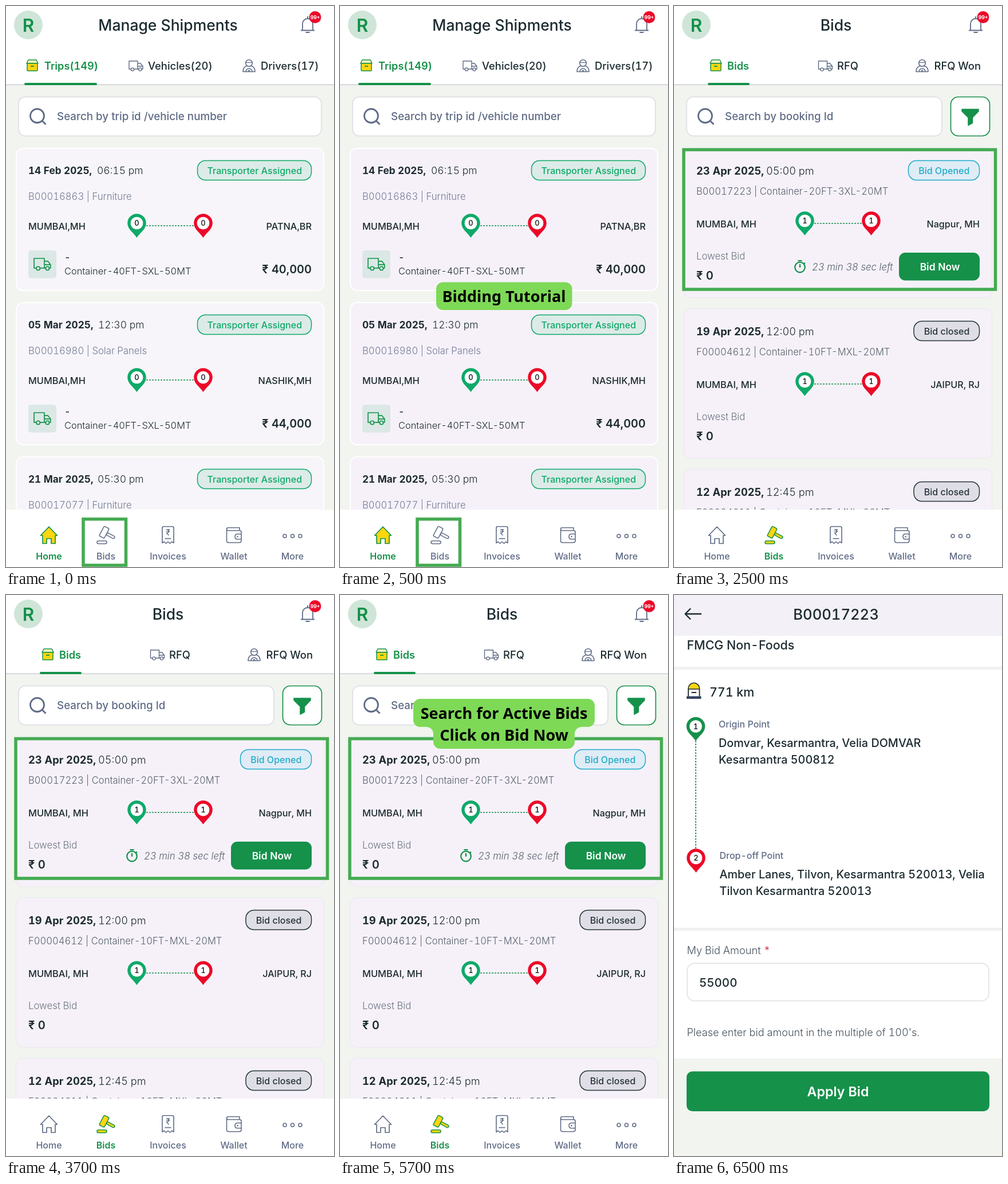
Recreate the animation shown at these times as an HTML page. Size 573 by 978 pixels, loop 8000 ms.

```html
<!DOCTYPE html>
<html lang="en">
<head>
<meta charset="utf-8">
<title>Shipment bidding</title>
<style>
html, body { margin: 0; height: 100%; overflow: hidden; background: #fff; }
svg { display: block; width: 573px; height: 978px; font-family: Inter, "Noto Sans", sans-serif; font-variant-numeric: tabular-nums; }
text { white-space: pre; }
.label { font-family: "Noto Sans", "Open Sans", sans-serif; }
</style>
</head>
<body>
<svg id="stage" viewBox="0 0 573 978"></svg>
<script>
const GREEN = '#15914a', DARK = '#1c2b30', SLATE = '#5f6b85', RED = '#ec0928',
  YELLOW = '#ffd60f', PAGE = '#f1f4ef', MINT = '#0fa968', MUTED = '#737b95', LIME = '#7ed957';

// y is the middle of the capitals
const text = (x, y, s, size, weight = 500, fill = DARK, anchor = 'start', extra = '') =>
  `<text x="${x}" y="${y + size * .36}" font-size="${size}" font-weight="${weight}" fill="${fill}" text-anchor="${anchor}" ${extra}>${s}</text>`;
const rect = (x, y, w, h, fill, r = 0, stroke = 'none', sw = 1.5) =>
  `<rect x="${x}" y="${y}" width="${w}" height="${h}" rx="${r}" fill="${fill}" stroke="${stroke}" stroke-width="${sw}"/>`;
const path = (d, stroke, sw = 1.6, fill = 'none', extra = '') =>
  `<path d="${d}" fill="${fill}" stroke="${stroke}" stroke-width="${sw}" stroke-linejoin="round" ${extra}/>`;
const circle = (x, y, r, fill, stroke = 'none', sw = 1.6) =>
  `<circle cx="${x}" cy="${y}" r="${r}" fill="${fill}" stroke="${stroke}" stroke-width="${sw}"/>`;
const at = (x, y, s, scale = 1) => `<g transform="translate(${x} ${y}) scale(${scale})">${s}</g>`;

const pin = (x, y, n, fill) => at(x, y,
  path('M0 25.5C-5 17-16.3 11-16.3 0A16.3 16.3 0 0 1 16.3 0C16.3 11 5 17 0 25.5Z', 'none', 0, fill) +
  circle(0, 0, 10.8, '#fff') + text(0, 0, n, 13, 500, '#111', 'middle'));
const dots = (d, w = 1.3) => path(d, GREEN, w, 'none', 'stroke-dasharray="3 2"');
const route = y => dots(`M245 ${y + 4.5}H329`);
const truck = (x, y, color, scale = 1) => at(x, y,
  path('M3.5 14H0V0H15V14H9M15 4H20L24 9V14H22M15 14H17M15 9H24', color, 1.4) +
  circle(6, 14.5, 2.6, 'none', color, 1.4) + circle(19.5, 14.5, 2.6, 'none', color, 1.4), scale);
const box = x => at(x, 93,
  path('M3 1H17L20 7H0Z', GREEN, 1.5, '#fff6c0') + rect(1, 7, 18, 13, YELLOW, 1, GREEN) +
  path('M7 12H13', GREEN, 1.8));
const driver = x => at(x, 93,
  circle(10.5, 6.5, 5.8, 'none', SLATE) + path('M5 5.5H16', SLATE, 1.2) +
  path('M6.5 11.5C2 13 0 17 0 21.5H21C21 17 19 13 14.5 11.5M5 21.5A5.5 5.5 0 0 1 16 21.5', SLATE, 1.5) +
  circle(10.5, 20, 1.2, 'none', SLATE, 1.2));

const pill = (x, y, s, fill, color, textFill = color) =>
  rect(x, y, 533.5 - x, 34, fill, 14, color) + text((x + 534) / 2, y + 17.5, s, 16, 500, textFill, 'middle');

function header(title) {
  return rect(0, 0, 573, 137, '#fff') + rect(0, 136.5, 573, 1.5, '#cdcfd4') +
    circle(39, 33, 25, '#cfe5d8') + text(39, 34, 'R', 31.5, 600, GREEN, 'middle') +
    text(283, 33.5, title, 26.5, 550, DARK, 'middle') +
    path('M515 42.5H539M518 42V31A9 9 0 0 1 536 31V42M527 18V22M523.5 46H530.5', SLATE, 1.8) +
    circle(540, 19.5, 10.5, RED) + text(540, 19.5, '99+', 8.6, 700, '#fff', 'middle');
}

function tabs(list, from, to) {
  const [a, b, c] = list;
  return box(a[0]) + text(a[1], 104, a[2], 18.2, 600, GREEN) +
    truck(b[0], 96, SLATE) + text(b[1], 104, b[2], 18.4) +
    driver(c[0]) + text(c[1], 104, c[2], 18.4) +
    rect(from, 134, to - from, 4, GREEN, 2);
}

const search = (w, s) => rect(22, 158.5, w, 68, '#fff', 12, '#dadce2') +
  circle(54.5, 191.5, 12, 'none', SLATE, 2.8) + path('M63 200L69.5 206.5', SLATE, 2.8) +
  text(89, 192.5, s, 18.8, 500, SLATE);

function nav(active) {
  const ink = n => active === n ? GREEN : SLATE, fill = n => active === n ? YELLOW : 'none';
  const name = (x, s) => text(x, 959.5, s, 16, active === s ? 600 : 500, ink(s), 'middle');
  const h = ink('Home'), b = ink('Bids');
  return rect(0, 878, 573, 100, '#fff') +
    path('M60.5 923L75 908L89.5 923H86V937H79V928.5H71V937H64V923Z', h, 1.7, fill('Home')) +
    rect(159, 932.5, 17, 5, fill('Bids'), 2.5, b) +
    `<g transform="translate(171.5 917.5) rotate(28)">${
      rect(5, -2.2, 15.5, 4.5, fill('Bids'), 2.2, b)}${rect(-5, -9.5, 10, 19, fill('Bids'), 2, b)}</g>` +
    path('M273 936V910Q273 907.5 275.5 907.5H290.5Q293 907.5 293 910V936L289.7 934L286.4 937L283 934L279.6 937L276.3 934Z', SLATE) +
    text(283, 918, '₹', 14, 500, SLATE, 'middle') + path('M277.5 928.5H288.5', SLATE) +
    path('M385.5 913V932Q385.5 935.5 389 935.5H407.5Q411 935.5 411 932V917Q411 914.5 408 914.5H388Q385.5 914.5 385.5 912T388 909.5H408V914', SLATE) +
    path('M411 920.5H403.5Q400 921 400 925T403.5 929.5H411', SLATE) + circle(404.5, 925, 1.3, SLATE) +
    [487, 500.5, 514].map(x => circle(x, 924, 3, 'none', SLATE)).join('') +
    name(75, 'Home') + name(174.5, 'Bids') + name(283, 'Invoices') + name(398, 'Wallet') + name(500.5, 'More');
}

const tripCard = (i, date, time, timeX, id, to, price) => at(0, i * 269,
  rect(18, 248, 537, 248, 'var(--card)', 12, '#fff', 2) +
  text(39, 287, date, 17.2, 700) + text(timeX, 287, time, 17.5, 300) +
  pill(334.5, 269.5, 'Transporter Assigned', '#dcebe8', MINT) +
  text(39, 331.5, id, 16.7, 300, MUTED) +
  text(39, 384, 'MUMBAI,MH', 16.3) + text(534, 384, to, 16.3, 500, DARK, 'end') +
  route(378.5) + pin(228.5, 378.5, 0, MINT) + pin(344.5, 378.5, 0, RED) +
  rect(39, 426, 49, 48.5, '#dbe8e6', 5) + truck(49, 440, GREEN, 1.2) +
  text(102, 438, '-', 16.4) + text(102, 462.5, 'Container-40FT-SXL-50MT', 16.4, 300) +
  text(534, 458.5, price, 20, 600, DARK, 'end'));

const bidCard = (i, date, time, id, to, status) => at(0, i * 280,
  rect(17.5, 247.5, 538, 261, '#f6f1f9', 12, '#e9e7ee', 1) +
  text(39, 287, date, 18.3, 700) + text(161, 287, time, 18.2, 300) + status +
  text(39, 323, id, 16.6, 300, '#56606c') +
  text(39, 380, 'MUMBAI, MH', 16.4) + text(534, 380, to, 16.1, 500, DARK, 'end') +
  route(374.5) + pin(228.5, 374.5, 1, MINT) + pin(344.5, 374.5, 1, RED) +
  text(39, 436, 'Lowest Bid', 16.8, 300, '#6b7480') + text(39, 470, '₹ 0', 20.3, 600));

const closed = pill(419, 269.5, 'Bid closed', '#dfdee6', '#26343a');
const frame = (x, y, w, h) => rect(x, y, w, h, 'none', 0, '#45ab52', 5.5);

const home = rect(0, 0, 573, 978, PAGE) + header('Manage Shipments') +
  tabs([[36, 67, 'Trips(149)'], [215, 248, 'Vehicles(20)'], [414, 445, 'Drivers(17)']], 32, 159) +
  search(529, 'Search by trip id /vehicle number') +
  tripCard(0, '14 Feb 2025,', '06:15 pm', 159, 'B00016863 | Furniture', 'PATNA,BR', '₹ 40,000') +
  tripCard(1, '05 Mar 2025,', '12:30 pm', 161, 'B00016980 | Solar Panels', 'NASHIK,MH', '₹ 44,000') +
  tripCard(2, '21 Mar 2025,', '05:30 pm', 160, 'B00017077 | Furniture', 'PATNA,BR', '₹ 40,000') +
  nav('Home') + frame(135, 894.5, 74.5, 80.5);

const bids = rect(0, 0, 573, 978, PAGE) + header('Bids') +
  tabs([[63, 93, 'Bids'], [252.5, 285, 'RFQ'], [423, 454.5, 'RFQ Won']], 59, 132) +
  search(446, 'Search by booking Id') +
  rect(483.5, 158.5, 68, 68, '#fff', 13, GREEN, 1.7) +
  path('M503 180H532V183.5L521.5 194.5V204L514 208V194.5L503 183.5Z', GREEN, 1.5, GREEN) +
  bidCard(0, '23 Apr 2025,', '05:00 pm', 'B00017223 | Container-20FT-3XL-20MT', 'Nagpur, MH',
    pill(409.5, 269.5, 'Bid Opened', '#dfecf6', '#1eabc8')) +
  circle(220, 455.5, 8.8, 'none', GREEN, 2.2) + path('M216.5 444H223.5M220 450V456M227 447.5L229 449.5', GREEN, 2.2) +
  text(241, 454.5, '23 min 38 sec left', 16.8, 300, '#56606c', 'start', 'font-style="italic"') +
  rect(393, 430, 141, 48.5, GREEN, 11) + text(464.5, 454.5, 'Bid Now', 17.4, 600, '#fff', 'middle') +
  bidCard(1, '19 Apr 2025,', '12:00 pm', 'F00004612 | Container-10FT-MXL-20MT', 'JAIPUR, RJ', closed) +
  bidCard(2, '12 Apr 2025,', '12:45 pm', 'F00004611 | Container-10FT-MXL-20MT', 'JAIPUR, RJ', closed) +
  frame(17, 250.5, 544.5, 243.5) + nav('Bids');

const detail = rect(0, 0, 573, 978, '#fff') + rect(0, 0, 573, 71, '#f3f0f7') +
  path('M48 33H20M29 23.5L19.5 33L29 42.5', DARK, 2.3) +
  text(283, 33.5, 'B00017223', 25.6, 500, DARK, 'middle') +
  text(22.5, 87.5, 'FMCG Non-Foods', 21.4) +
  rect(0, 125, 573, 5.5, '#f1f1f3') + rect(0, 580, 573, 5.5, '#f1f1f3') +
  path('M25 164V163A9.7 9.7 0 0 1 44.5 163V164Z', DARK, 1.5, YELLOW) +
  path('M25 164V177M44.5 164V177M30.5 170H39', DARK, 1.8) + rect(22, 176.5, 25.5, 4.5, '#34435e') +
  text(62, 169.5, '771 km', 21.4) +
  dots('M38 254V442', 1.7) + pin(38, 229, 1, GREEN) + pin(38.5, 458.5, 2, RED) +
  text(78, 225, 'Origin Point', 16, 500, SLATE) +
  text(78, 257.5, 'Domvar, Kesarmantra, Velia DOMVAR', 19.8) + text(78, 286.5, 'Kesarmantra 500812', 19.8) +
  text(79.5, 454.5, 'Drop-off Point', 16, 500, SLATE) +
  text(79.5, 487, 'Amber Lanes, Tilvon, Kesarmantra 520013, Velia', 19.8) +
  text(79.5, 516, 'Tilvon Kesarmantra 520013', 19.8) +
  text(22.5, 619.5, 'My Bid Amount <tspan fill="#d0213a">*</tspan>', 18.2, 300, '#45515c') +
  rect(23, 642, 527, 65.5, '#fff', 13, '#dfe0e4') + text(44, 675.5, '55000', 20.5) +
  text(22.5, 762.5, "Please enter bid amount in the multiple of 100's.", 18.1, 300, '#45515c') +
  rect(0, 808, 573, 170, PAGE) + rect(22, 830.5, 529, 69.5, GREEN, 10) +
  text(286.5, 866, 'Apply Bid', 23.2, 600, '#fff', 'middle');

const caption = (x, y, s) => text(x, y, s, 27, 700, '#000', 'middle', 'class="label"');
const intro = rect(168, 481.5, 237.5, 48.5, LIME, 12) + caption(286.5, 506, 'Bidding Tutorial');
const hint = path('M140 181H433a12 12 0 0 1 12 12v25a12 12 0 0 1-12 12h-11a12 12 0 0 0-12 12v14a12 12 0 0 1-12 12H175a12 12 0 0 1-12-12v-14a12 12 0 0 0-12-12h-11a12 12 0 0 1-12-12v-25a12 12 0 0 1 12-12z', 'none', 0, LIME) +
  caption(286.5, 206, 'Search for Active Bids') + caption(286.5, 244, 'Click on Bid Now');

// each layer is visible from its start to its end
const layers = [[home, 0, 2500], [intro, 500, 2500], [bids, 2500, 6500], [hint, 4500, 6500], [detail, 6500, 8000]];
const stage = document.getElementById('stage');
stage.innerHTML = layers.map(l => `<g>${l[0]}</g>`).join('');
const groups = [...stage.children];

function draw() {
  const t = performance.now() % 8000;
  stage.style.setProperty('--card', t < 500 ? '#f7f5f9' : '#f6f1f9');
  layers.forEach(([, from, to], i) => {
    groups[i].style.display = t >= from && t < to ? '' : 'none';
  });
  requestAnimationFrame(draw);
}
draw();
</script>
</body>
</html>
```
